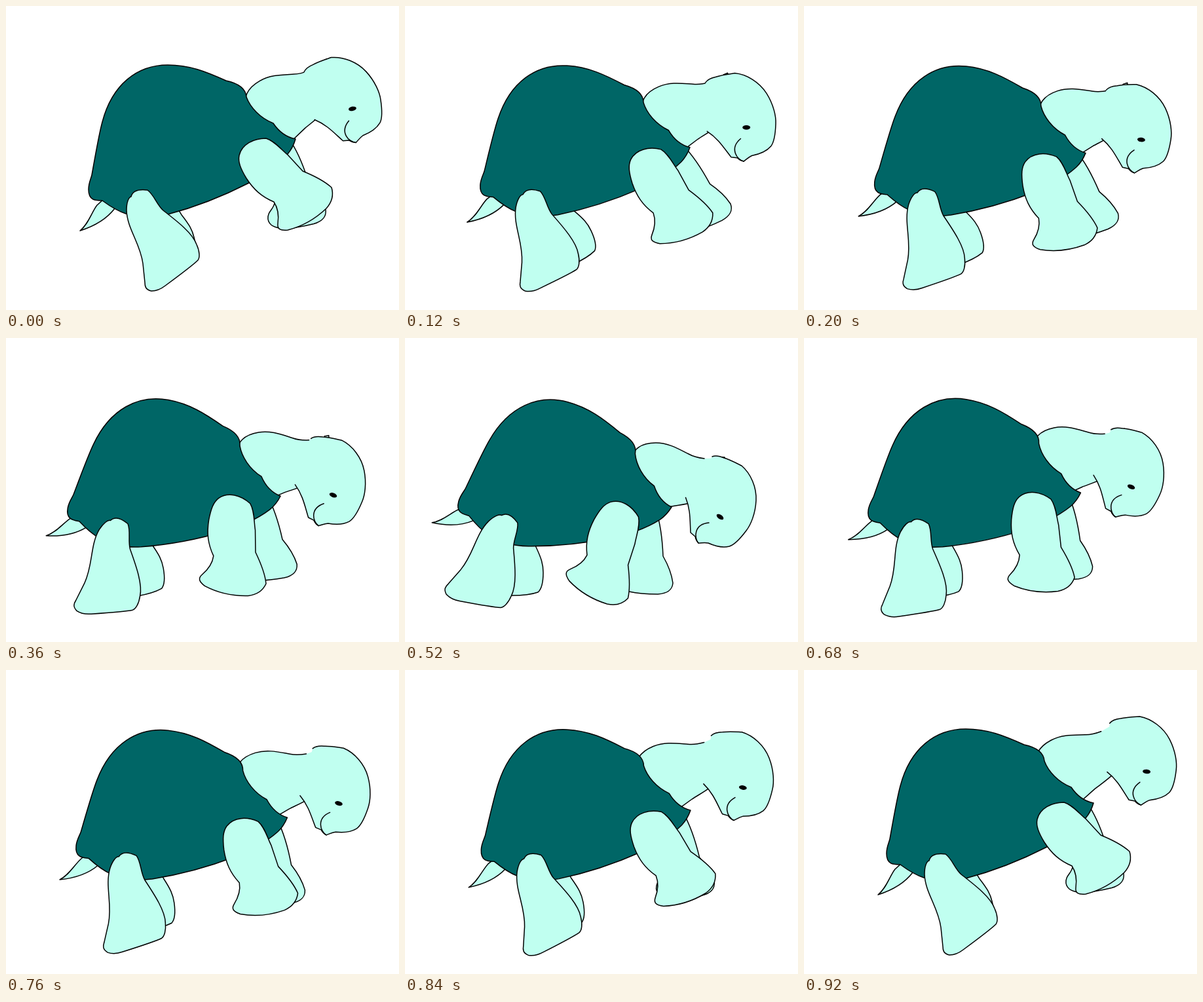
Animation, 600 px wide and 464 px high, one loop 0.96 s. Source, as an HTML page with a canvas:

```html
<!DOCTYPE html>
<html lang="en">
<head>
<meta charset="utf-8">
<title>Walking turtle</title>
<style>
  html, body { margin: 0; width: 100%; height: 100%; overflow: hidden; background: #fff; }
  canvas { display: block; }
</style>
</head>
<body>
<canvas id="stage" width="600" height="464"></canvas>
<script>
const ctx = document.getElementById('stage').getContext('2d');
const STEP = 40, STEPS = 24;
const SKIN = '#c0fff0', SHELL = '#006666';

// home: pivot in the drawing's coordinates; poses: [step, pivot x, pivot y, degrees]
const part = (home, poses, layers) => ({
  home, poses,
  layers: layers.map(({ d, ...style }) => ({ path: new Path2D(d), ...style }))
});
const solid = (d, fill = SKIN) => ({ d, fill, line: true });
const fillOnly = d => ({ d, fill: SKIN });
const lineOnly = d => ({ d, line: true });

// Swing out from the home pose and back again
const swing = (home, x, y, deg) => [[0, ...home, 0], [13, x, y, deg], [23, ...home, 0]];
const swinging = (home, x, y, deg, layers) => part(home, swing(home, x, y, deg), layers);

const tail = swinging([167.6, 284], 118, 258, 30, [solid(
  'M113 343C126 333 131 314 139 304C148 295 158 287 170 285L175 300L166 309C153 326 135 336 113 343Z')]);

const farHind = part([208, 383],
  [[0, 290, 379, -13], [3, 292, 367, -25], [13, 208, 383, 0], [23, 290, 379, -13]],
  [solid('M192 295L200 319C208 336 211 345 211 358C211 374 209 383 203 388C192 392 178 393 163 393' +
    'C148 394 135 396 135 388C136 376 144 362 146 350L150 310Z')]);

const farFront = part([409, 374],
  [[0, 488, 310.5, -14], [3, 497, 302, -26], [13, 409, 374, 0], [23, 488, 310.5, -14]],
  [solid('M383 262C390 283 393 308 394 333C402 347 407 359 409 374C408 384 402 390 386 391' +
    'C370 391 355 390 342 387C328 384 319 377 320 367C322 355 332 355 336 345C340 330 336 315 338 300L345 268Z')]);

const neck = part([322.6, 215.9],
  [[0, 363, 193, -30], [13, 322.6, 215.9, 0], [23, 350, 185, -28]],
  [
    fillOnly('M340 200C345 165 365 160 383 160C402 160 417 169 433 177C440 181 449 183 457 184' +
      'L488 183L440 251L407 257L370 266Z'),
    lineOnly('M340 200C345 165 365 160 383 160C402 160 417 169 433 177C440 181 449 183 457 184'),
    lineOnly('M481 182L488 182L487 187'),
    lineOnly('M440 251C428 254 418 255 407 257L370 266')
  ]);

const head = part([441, 217],
  [[0, 461, 146, -45.4], [13, 441, 217, 0], [23, 460.4, 126.5, -30]],
  [
    solid('M469 181C474 179 480 180 487 183C497 186 506 191 514 195C528 207 537 228 536 248' +
      'C535 268 528 285 521 294C512 306 502 316 495 318C483 321 472 317 463 313' +
      'C457 312 453 313 448 313Q444 309 443 303L436 297C435 278 436 262 428.5 243.5'),
    lineOnly('M448 313C441 305 441 284 464 282')
  ]);
const eye = new Path2D();
eye.ellipse(481, 273, 6, 3.3, 0.6, 0, Math.PI * 2);
head.layers.push({ path: eye, fill: '#000' });

const shell = swinging([270, 200], 241.8, 210, 15.2, [solid(
  'M131 258C136 230 142 195 147 177C162 120 200 90 247 90C280 90 305 100 336 114' +
  'C350 117 366 124 367 139C373 155 388 171 408 179C416 191 427 200 442 203' +
  'C440 210 436 219 430 226C412 246 385 263 371 270C330 291 285 308 247 318' +
  'C225 323 205 325 183 317C170 313 158 305 147 297C138 297 126 298 126 280C126 270 130 263 131 258Z', SHELL)]);

const nearHind = swinging([198, 262], 173.5, 256, 47, [solid(
  'M216 281C226 288 230 303 240 312C262 329 285 347 291 364C296 375 296 384 293 388' +
  'C285 396 262 413 243 427C234 434 228 435 222 435C213 433 212 428 212 422L209 393' +
  'C205 362 185 340 184 312C184 300 187 292 191 291C193 283 200 279 216 281Z')]);

const nearFront = swinging([365, 212], 332, 250.3, 60.5, [solid(
  'M397 202C410 206 420 219 430 227L453 252C470 259 485 266 497 277C501 290 497 300 489 309' +
  'C470 327 450 337 430 342C418 343 414 340 415 332C417 318 415 308 409 299' +
  'C390 291 378 280 367 263C358 248 354 238 356 228C360 211 378 202 397 202Z')]);

const turtle = [tail, farHind, farFront, neck, head, shell, nearHind, nearFront];

function poseAt(poses, step) {
  const i = poses.findIndex(p => p[0] > step);
  if (i < 0) return poses[poses.length - 1].slice(1);
  const a = poses[i - 1], b = poses[i];
  const k = (step - a[0]) / (b[0] - a[0]);
  return a.slice(1).map((v, j) => v + (b[j + 1] - v) * k);
}

function drawPart({ home, poses, layers }, step) {
  const [x, y, deg] = poseAt(poses, step);
  ctx.save();
  ctx.translate(x, y);
  ctx.rotate(deg * Math.PI / 180);
  ctx.translate(-home[0], -home[1]);
  for (const { path, fill, line } of layers) {
    if (fill) { ctx.fillStyle = fill; ctx.fill(path); }
    if (line) ctx.stroke(path);
  }
  ctx.restore();
}

function render() {
  const step = Math.floor(performance.now() / STEP) % STEPS;
  ctx.fillStyle = '#fff';
  ctx.fillRect(0, 0, 600, 464);
  ctx.strokeStyle = '#000';
  ctx.lineWidth = 1.5;
  ctx.lineJoin = ctx.lineCap = 'round';
  turtle.forEach(p => drawPart(p, step));
  requestAnimationFrame(render);
}
render();
</script>
</body>
</html>
```
